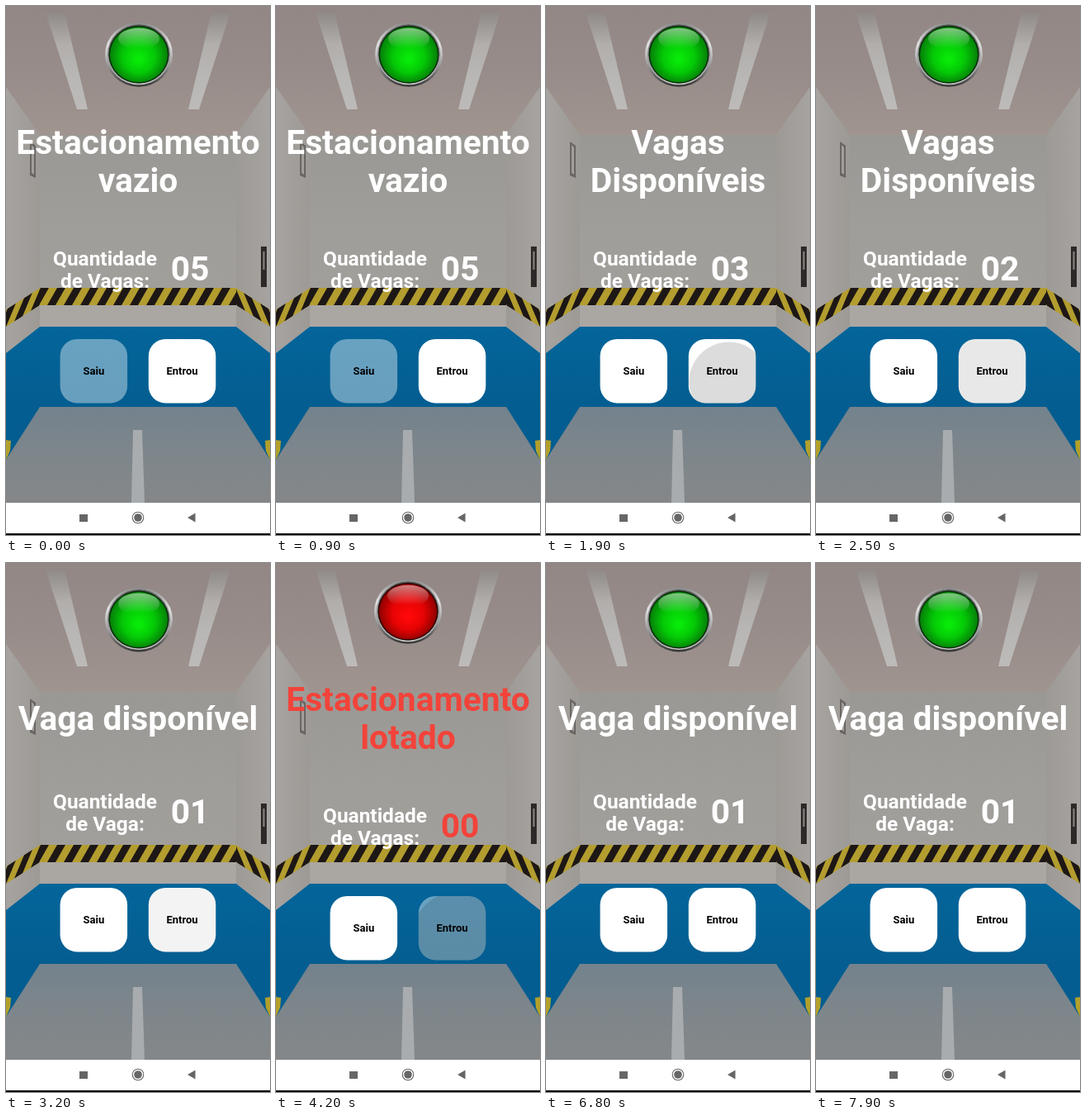
An HTML page with a canvas for the animation above (8000 ms loop, 320 by 640 pixels).

```html
<!DOCTYPE html>
<html lang="pt">
<head>
<meta charset="utf-8">
<title>Estacionamento</title>
<style>
  html, body { margin: 0; width: 100%; height: 100%; overflow: hidden; }
  canvas { display: block; width: 320px; height: 640px; }
</style>
</head>
<body>
<canvas id="stage"></canvas>
<script>
const WIDTH = 320, HEIGHT = 640, LOOP = 8000;
const SPACES = 5;
const DP = 0.8148; // stage pixels per layout unit
const PRESS = 100, FADE = 350;
const ratio = window.devicePixelRatio || 1;

function makeContext(canvas) {
  canvas.width = WIDTH * ratio;
  canvas.height = HEIGHT * ratio;
  const context = canvas.getContext('2d');
  context.scale(ratio, ratio);
  return context;
}

const screen = makeContext(document.getElementById('stage'));
let ctx = screen;

const entries = [1280, 1850, 2350, 2950, 4120];
const exits = [6200];

function poly(fill, ...points) {
  ctx.beginPath();
  points.forEach(([x, y]) => ctx.lineTo(x, y));
  ctx.closePath();
  ctx.fillStyle = fill;
  ctx.fill();
}

function rect(fill, x, y, w, h) {
  ctx.fillStyle = fill;
  ctx.fillRect(x, y, w, h);
}

function oval(fill, x, y, rx, ry = rx) {
  ctx.beginPath();
  ctx.ellipse(x, y, rx, ry, 0, 0, Math.PI * 2);
  ctx.fillStyle = fill;
  ctx.fill();
}

function withStops(gradient, colors) {
  colors.forEach((c, i) => gradient.addColorStop(i / (colors.length - 1), c));
  return gradient;
}

const vertical = (y0, y1, ...colors) => withStops(ctx.createLinearGradient(0, y0, 0, y1), colors);
const horizontal = (x0, x1, ...colors) => withStops(ctx.createLinearGradient(x0, 0, x1, 0), colors);

function text(str, x, y, units, color) {
  ctx.font = `bold ${units * DP}px Roboto, sans-serif`;
  ctx.textAlign = 'center';
  ctx.fillStyle = color;
  ctx.fillText(str, x, y);
}

// Hazard tape from x0 to x1, sheared around the corner of the back wall.
function tape(x0, x1, slope) {
  const top = 341, height = 21, period = 20, lean = 12;
  ctx.save();
  ctx.transform(1, slope, 0, 1, 0, -slope * 41);
  ctx.beginPath();
  ctx.rect(x0, top, x1 - x0, height);
  ctx.clip();
  rect('#b39d2f', x0, top, x1 - x0, height);
  for (let x = -period / 2; x < WIDTH; x += period) {
    poly('#1d1716', [x + lean, top], [x + lean + 10, top], [x + 10, top + height], [x, top + height]);
  }
  ctx.restore();
}

// Everything that the left and right sides of the garage share.
function garageSide() {
  poly(horizontal(0, 42, '#a6a3a0', '#9d9a96'), [0, 98], [41, 156], [41, 390], [0, 424]);
  poly(vertical(8, 125, '#8f8a87', '#b1aeac', '#b9b7b5', '#bdbbb9'),
    [48, 8], [71, 8], [99, 125], [86, 125]);
  tape(0, 41, -0.64);
  poly(vertical(388, 486, '#04659a', '#045d90'), [0, 420], [41, 388], [161, 388], [161, 490], [0, 560]);
  poly(vertical(485, 600, '#73828d', '#7e868b', '#848789'),
    [41, 485], [161, 485], [161, 601], [0, 601], [0, 549]);
  poly('#b3a02a', [0, 525], [6, 526], [5, 538], [0, 549]);
}

function garage() {
  rect(vertical(0, 155, '#928784', '#978c89', '#a0948f'), 0, 0, WIDTH, 157);
  rect(vertical(156, 388, '#9a9894', '#a09e9a', '#a29f9b'), 41, 156, 238, 233);
  rect('#aaa6a2', 41, 362, 238, 26);
  garageSide();
  ctx.save();
  ctx.transform(-1, 0, 0, 1, WIDTH, 0);
  garageSide();
  ctx.restore();
  tape(41, 279, 0);

  poly('#686562', [29, 164], [36, 169], [36, 208], [29, 205]);
  poly('#a19e9b', [31, 168], [34, 171], [34, 204], [31, 202]);
  rect('#2d2928', 309, 291, 7, 49);
  rect('#8b8784', 311.5, 297, 2, 22);
  poly('#a8acae', [154, 513], [165, 513], [168, 601], [152, 601]);
}

// The still room is painted once and softened like a photograph.
function paintBackdrop() {
  const canvas = document.createElement('canvas');
  ctx = makeContext(canvas);
  garage();
  ctx.filter = `blur(${0.7 * ratio}px)`;
  ctx.drawImage(canvas, 0, 0, WIDTH, HEIGHT);
  ctx = screen;
  return canvas;
}

const backdrop = paintBackdrop();

function navigation() {
  rect('#fff', 0, 601, WIDTH, 37);
  rect('#000', 0, 638, WIDTH, 2);
  rect('#666', 89, 615, 10, 9);
  oval('#666', 160, 619, 7.3);
  oval('#fff', 160, 619, 6.2);
  oval('#666', 160, 619, 4.8);
  poly('#666', [220, 619], [229.5, 613.5], [229.5, 624.5]);
}

function lamp(x, y, red) {
  const shades = red ? ['#ff0808', '#e50304', '#8a0000'] : ['#08ea08', '#04c806', '#057c09'];
  oval(vertical(y - 39, y + 39, '#8a8a8a', '#e2e2e2', '#9a9a9a', '#333'), x, y, 41, 39);
  oval(vertical(y - 37, y + 37, '#555', '#888', '#ccc'), x, y, 38, 36.5);
  oval(red ? '#2b0302' : '#052c07', x, y, 36.5, 35);
  oval(withStops(ctx.createRadialGradient(x, y + 6, 3, x, y, 36), shades), x, y, 35, 33.5);
  oval(vertical(y - 32, y - 8, 'rgba(255,255,255,.5)', 'rgba(255,255,255,0)'), x, y - 19, 25, 13);
}

function button(label, x, y, enabled, taps, time) {
  const width = 100 * DP, height = 95 * DP;
  const tap = taps.find(at => time >= at - PRESS && time < at + FADE);
  ctx.save();
  ctx.beginPath();
  ctx.roundRect(x, y, width, height, 25 * DP);
  ctx.fillStyle = enabled ? '#fff' : 'rgba(255,255,255,.4)';
  ctx.fill();
  if (tap) {
    const age = time - tap;
    const alpha = 0.16 * Math.min(1, 1 - age / FADE);
    ctx.clip();
    oval(`rgba(0,0,0,${alpha})`, x + width * 0.6, y + height * 0.67, 80 * Math.min(1, (age + PRESS) / 250));
  }
  ctx.restore();
  text(label, x + width / 2, y + 43, 16, '#000');
}

function titleFor(free) {
  if (free === 0) return ['Estacionamento', 'lotado'];
  if (free === 1) return ['Vaga disponível'];
  return free === SPACES ? ['Estacionamento', 'vazio'] : ['Vagas', 'Disponíveis'];
}

function draw(time) {
  const count = taps => taps.filter(at => at <= time).length;
  const free = SPACES - count(entries) + count(exits);
  const single = free === 1;
  const full = free === 0;
  const accent = full ? '#f2433a' : '#fff';
  const titleY = single ? 201.6 : 178.6;
  const labelY = single ? 297 : 313.7;
  const buttonY = single ? 393 : 403;

  ctx.drawImage(backdrop, 0, 0, WIDTH, HEIGHT);
  lamp(full ? 160 : 161, single ? 68.5 : 58.7, full);
  titleFor(free).forEach((line, i) => text(line, 160, titleY + i * 46, 50, accent));
  text('Quantidade', 120, labelY, 30, '#fff');
  text(single ? 'de Vaga:' : 'de Vagas:', 120, labelY + 27, 30, '#fff');
  text('0' + free, 223, labelY + 18, 50, accent);
  button('Saiu', 65.6, buttonY, free < SPACES, exits, time);
  button('Entrou', 172.8, buttonY, !full, entries, time);
  navigation();
}

function tick() {
  draw(performance.now() % LOOP);
  requestAnimationFrame(tick);
}
tick();
</script>
</body>
</html>
```
